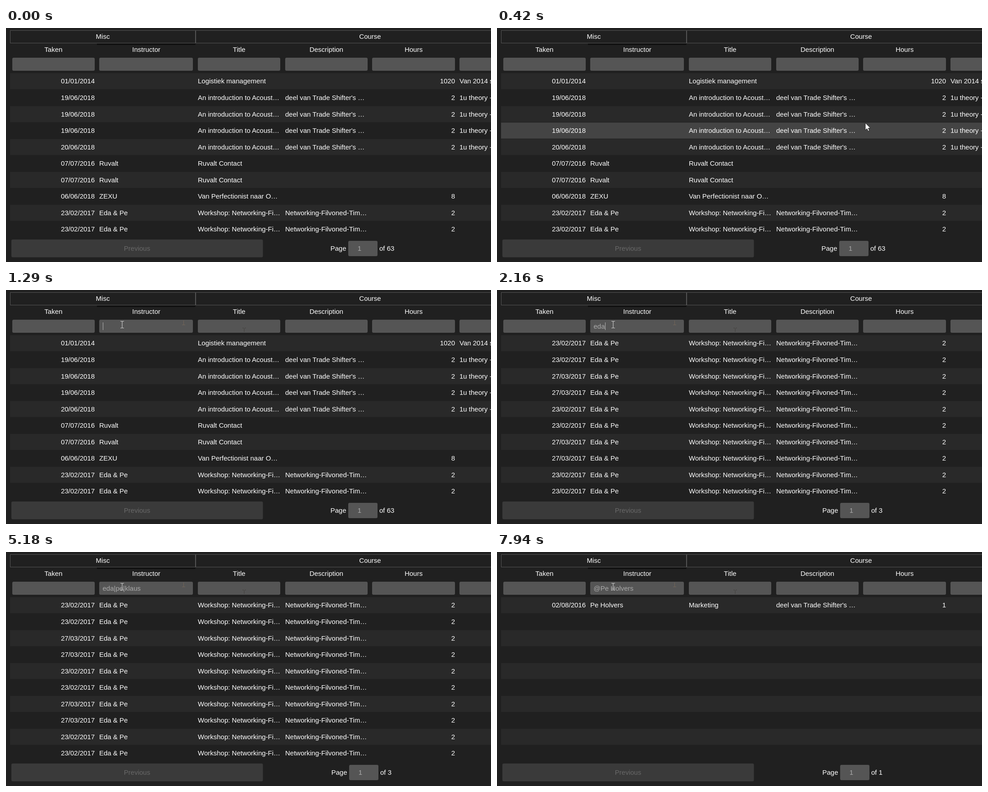
Recreate the animation shown at these times as an HTML page. Size 1077 px wide and 520 px high, loop 8 s.

```html
<!DOCTYPE html>
<html lang="en">
<head>
<meta charset="utf-8">
<title>Course table filter</title>
<style>
  html, body { margin: 0; width: 100%; height: 100%; overflow: hidden; background: #202020; }
  svg { display: block; width: 1077px; height: 520px; }
  text { font: 15px "Liberation Sans", Arial, sans-serif; fill: #fff; white-space: pre; }
  .field { fill: #555; }
  .muted { fill: #aaa; }
  .off { fill: #686868; }
  .line { fill: none; stroke: #555; }
</style>
</head>
<body>
<svg id="stage" viewBox="0 0 1077 520"></svg>
<script>
const LOOP = 8000, ROWS = 10, ROW_TOP = 100.5, PITCH = 36.55, ROW_H = 35.6;
const stage = document.getElementById('stage');

function add(tag, attrs, parent = stage) {
  const el = document.createElementNS('http://www.w3.org/2000/svg', tag);
  for (const k in attrs) el.setAttribute(k, attrs[k]);
  return parent.appendChild(el);
}
function label(str, x, y, anchor = 'start', cls = '', parent = stage) {
  const el = add('text', { x, y, 'text-anchor': anchor, class: cls }, parent);
  el.textContent = str;
  return el;
}
const box = (x, y, width, height, attrs, parent) =>
  add('rect', { x, y, width, height, ...attrs }, parent);
const field = (x, y, w, h, parent) => box(x, y, w, h, { class: 'field', rx: 3 }, parent);
const show = (el, on) => el.setAttribute('visibility', on ? 'visible' : 'hidden');

// Columns share one width; the instructor column is wider
const COL_W = 193.7, WIDE = 25;
const cols = ['Taken', 'Instructor', 'Title', 'Description', 'Hours', ''].map((name, i) => {
  const x = 8.5 + i * COL_W + (i > 1 ? WIDE : 0);
  const w = COL_W + (i === 1 ? WIDE : 0);
  const numeric = name === 'Taken' || name === 'Hours';
  return { name, mid: x + w / 2, left: Math.round(x + 5), right: Math.round(x + w - 5.5), numeric };
});

// Header
box(9.5, 5.5, 411, 28, { class: 'line' });
box(421.5, 5.5, 800, 28, { class: 'line' });
label('Misc', 215, 24, 'middle');
label('Course', 808.5, 24, 'middle');
box(202, 34.5, 218.5, 3, { fill: '#0e0e0e' });
for (const c of cols) {
  label(c.name, c.mid, 53, 'middle');
  field(c.left, 66, c.right - c.left, 29);
}

const stripes = Array.from({ length: ROWS }, (_, i) =>
  box(9, ROW_TOP + i * PITCH, 1068, ROW_H, {}));

// Rows follow the column order
const PART = "deel van Trade Shifter's …";
const FEB = '23/02/2017', MAR = '27/03/2017';
const intro = date => [date, '', 'An introduction to Acoust…', PART, '2', '1u theory + 1u practice'];
const workshop = date => [date, 'Eda & Pe', 'Workshop: Networking-Fi…', 'Networking-Filvoned-Tim…', '2'];
const portal = ['07/07/2016', 'Ruvalt', 'Ruvalt Contact'];

const all = [
  ['01/01/2014', '', 'Logistiek management', '', '1020', 'Van 2014 sinds'],
  ...Array(3).fill(intro('19/06/2018')), intro('20/06/2018'),
  portal, portal,
  ['06/06/2018', 'ZEXU', 'Van Perfectionist naar O…', '', '8'],
  workshop(FEB), workshop(FEB)
];
const pair = Array.from({ length: ROWS }, (_, i) => workshop(i % 4 < 2 ? FEB : MAR));
const single = [['02/08/2016', 'Pe Holvers', 'Marketing', PART, '1']];

function view(from, rows, pages, shift) {
  const el = add('g', {});
  rows.forEach((row, i) => row.forEach((str, c) => {
    const { left, right, numeric } = cols[c];
    const y = Math.round(123.4 + i * PITCH);
    if (str) label(str, numeric ? right : left, y, numeric ? 'end' : 'start', '', el);
  }));
  label('Page', 720.5 + shift, 495, 'start', '', el);
  field(760 + shift, 473, 65, 34, el);
  label('1', 785 + shift, 495, 'middle', 'muted', el);
  label('of ' + pages, 829 + shift, 495, 'start', '', el);
  return { from, el };
}
const full = view(0, all, 63, 0);
const views = [full, view(2160, pair, 3, 2), { ...full, from: 6610 }, view(7640, single, 1, 2)];

// Footer button
box(12, 470, 558.5, 39.5, { rx: 3, fill: '#3a3a3a' });
label('Previous', 291, 495, 'middle', 'off');

// Typing
const CLICK = 1000, CLEARED = 6510;
const typed = label('', 214.5, 86, 'start', 'muted');
const caret = box(0, 72, 1, 17, { fill: '#b4b4b4' });
const keys = [{ from: CLICK, str: '' }];
const press = (from, edit) => keys.push({ from, str: edit(keys[keys.length - 1].str) });
const write = (start, gap, str) =>
  [...str].forEach((ch, i) => press(start + i * gap, s => s + ch));
const erase = (start, gap, count) => {
  for (let i = 0; i < count; i++) press(start + i * gap, s => s.slice(0, -1));
};
write(1400, 210, 'eda');
write(2950, 220, '|p');
write(3390, 117, 'e|klause');
erase(4320, 0, 1);
erase(5610, 0, 1);
erase(6130, 38, 11);
write(6740, 70, '@Pe Holvers');

// Pointer, with the faint marks it leaves on the fields
const trail = [
  add('path', { d: 'M525 84.5h3M530 84.5h3M529 85v8', stroke: '#3c3a36', fill: 'none', opacity: .75 }),
  add('path', { d: 'M391 77.5h7M394.5 68v9', stroke: '#7c6c5a', fill: 'none', opacity: .75 })
];
const arrow = add('path', {
  d: 'M0 0V16L3.7 12.6L6.2 18.2L8.8 17.1L6.3 11.6H11.2Z',
  fill: '#fff', stroke: '#111', 'stroke-width': .8
});
const beam = add('path', {
  d: 'M-4 -7.5H-1L0 -6.5L1 -7.5H4M0 -6.5V6.5M-4 7.5H-1L0 6.5L1 7.5H4',
  fill: 'none', stroke: '#c8c8c8', 'stroke-width': 1.2
});
const ENTER = 100, LEAVE_ROWS = 610;
const stops = [
  { from: ENTER, x: 1070, y: 455 },
  { from: 420, x: 818, y: 211 },
  { from: 520, x: 818, y: 211 },
  { from: 580, x: 394.5, y: 71 },
  { from: 900, x: 258, y: 77 }
];

const at = (steps, t) => steps.filter(s => s.from <= t).pop() || steps[0];

function pointer(t) {
  const a = at(stops, t), b = stops[stops.indexOf(a) + 1];
  if (!b) return a;
  const p = Math.max(0, (t - a.from) / (b.from - a.from));
  const k = 1 - (1 - p) ** 2;
  return { x: a.x + (b.x - a.x) * k, y: a.y + (b.y - a.y) * k };
}

function draw(t) {
  const { x, y } = pointer(t);
  const inField = y < 96;
  for (const el of [arrow, beam]) el.setAttribute('transform', `translate(${x} ${y})`);
  show(arrow, !inField && t >= ENTER);
  show(beam, inField);
  show(trail[0], t >= 580);
  show(trail[1], t >= LEAVE_ROWS);

  // The first row stays lit briefly after the pointer leaves it
  const overRows = t >= ENTER && t < LEAVE_ROWS;
  const hover = overRows ? Math.max(0, Math.floor((y - ROW_TOP) / PITCH)) : -1;
  stripes.forEach((el, i) =>
    el.setAttribute('fill', i === hover ? '#444' : i % 2 ? '#202020' : '#292929'));

  const current = at(views, t).el;
  views.forEach(v => show(v.el, v.el === current));

  const { from, str } = at(keys, t);
  if (typed.textContent !== str) typed.textContent = str;
  caret.setAttribute('x', Math.round(214.5 + (str ? typed.getComputedTextLength() : 0)));
  const focused = t >= CLICK && !(t >= CLEARED && !str);
  show(caret, focused && (t - from) % 1000 < 500);
}

const start = performance.now();
function tick() {
  draw((performance.now() - start) % LOOP);
  requestAnimationFrame(tick);
}
tick();
</script>
</body>
</html>
```
